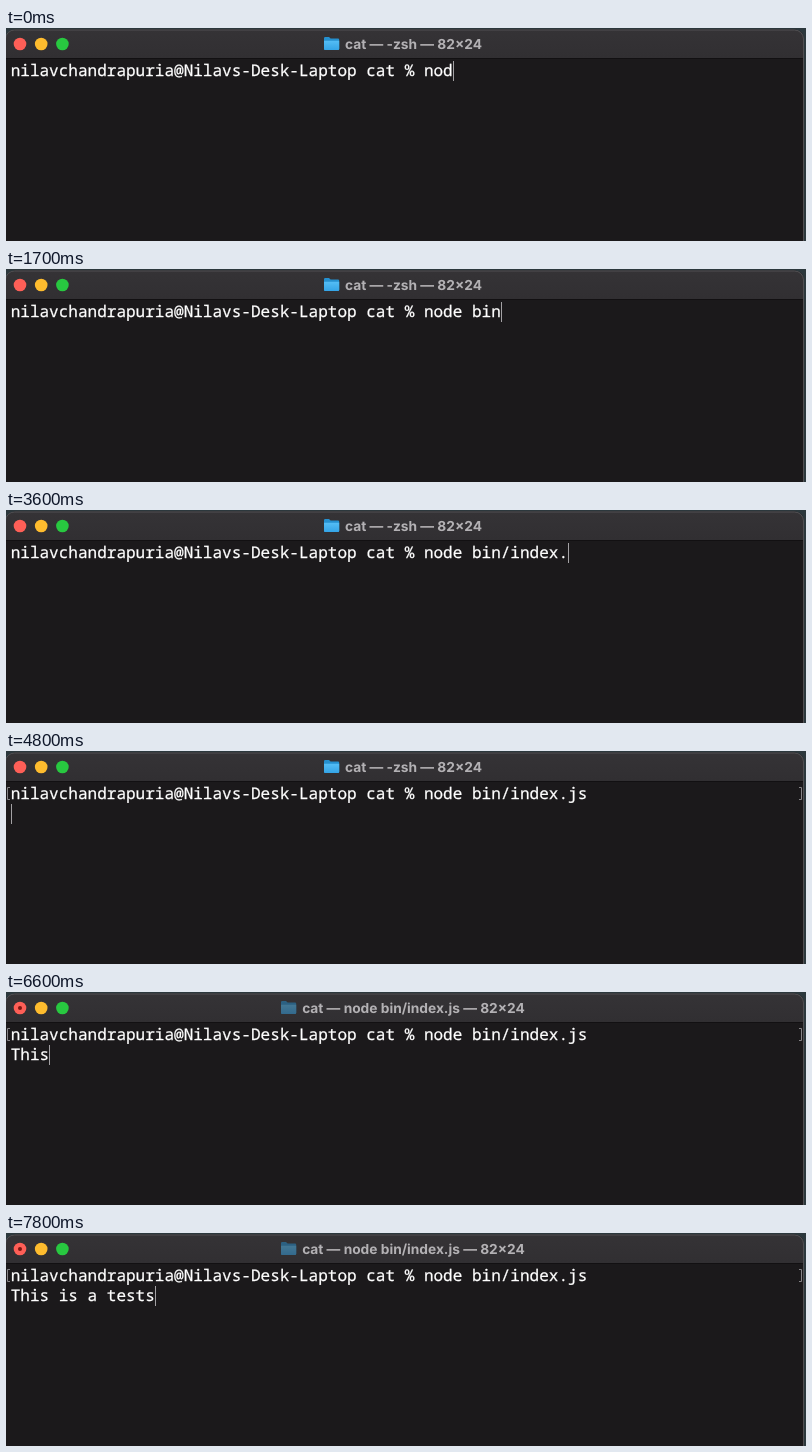
Recreate the animation shown at these times as an HTML page. Size 800 by 213 pixels, loop 8000 ms.

```html
<!DOCTYPE html>
<html lang="en">
<head>
<meta charset="utf-8">
<title>Terminal</title>
<style>
html, body { margin: 0; width: 100%; height: 100%; overflow: hidden; background: #2c383d; }
svg { display: block; width: 800px; height: 213px; }
text { white-space: pre; text-rendering: geometricPrecision; }
.mono { font: 500 16.02px "Noto Sans Mono", "DejaVu Sans Mono", monospace; fill: #fff; stroke: #fff; stroke-width: .25; }
#title { font: 700 13.75px Inter, "Open Sans", sans-serif; fill: #b3b1b4; text-anchor: middle; }
</style>
</head>
<body>
<svg viewBox="0 0 800 213">
  <defs>
    <clipPath id="frame"><rect x="0" y="1.5" width="798" height="240" rx="9"/></clipPath>
    <linearGradient id="bar" x2="0" y2="1">
      <stop offset="0" stop-color="#353336"/>
      <stop offset="1" stop-color="#312f32"/>
    </linearGradient>
    <linearGradient id="front" x2="0" y2="1">
      <stop offset="0" stop-color="#54bdf5"/>
      <stop offset="1" stop-color="#34a4e6"/>
    </linearGradient>
  </defs>
  <g clip-path="url(#frame)">
    <rect width="800" height="213" fill="#1b191b"/>
    <rect width="800" height="30" fill="url(#bar)"/>
    <rect y="30" width="800" height="1" fill="#121012"/>
  </g>
  <rect x="-.5" y="2" width="798" height="240" rx="9" fill="none" stroke="#504f52"/>
  <circle cx="14" cy="16" r="6.3" fill="#fe5f57"/>
  <circle id="busy" cx="14" cy="16" r="2" fill="#7d1710"/>
  <circle cx="35.2" cy="16" r="6.3" fill="#febc2e"/>
  <circle cx="56.4" cy="16" r="6.3" fill="#28c840"/>
  <g id="folder">
    <path d="M0 1.2Q0 0 1.2 0H5L6.6 1.6H14Q15.2 1.6 15.2 2.8V11.8Q15.2 13 14 13H1.2Q0 13 0 11.8Z" fill="#2590cf"/>
    <path d="M0 3.8H15.2V11.8Q15.2 13 14 13H1.2Q0 13 0 11.8Z" fill="url(#front)"/>
  </g>
  <text id="title" x="407.5" y="20.6"></text>
  <path id="marks" d="M4 36.5H1.5V48.5H4M793 36.5H795.5V48.5H793" fill="none" stroke="#858386"/>
  <text id="command" class="mono" x="4.7" y="48"></text>
  <text id="input" class="mono" x="4.7" y="68"></text>
  <rect id="cursor" width="1" height="20" fill="#a3a1a4"/>
</svg>
<script>
const LOOP = 8000, ENTER = 4800, RUNNING = 4900;
const LEFT = 4.7, ADVANCE = 9.612;
const prompt = "nilavchandrapuria@Nilavs-Desk-Laptop cat % ";

// Each line starts with some text; every key time adds one character.
const command = {
  start: prompt + "nod", keys: "e bin/index.js",
  times: [100, 200, 600, 900, 1100, 1800, 2000, 2100, 2300, 2700, 2900, 3300, 3700, 3900]
};
const input = {
  start: "", keys: "This is a tests",
  times: [5900, 6100, 6300, 6400, ...Array.from({ length: 11 }, (_, i) => 6800 + i * 100)]
};

const $ = id => document.getElementById(id);
const show = (id, on) => $(id).setAttribute("visibility", on ? "visible" : "hidden");
const typed = (line, t) => line.start + line.keys.slice(0, line.times.filter(k => k <= t).length);

function draw(t) {
  const entered = t >= ENTER, running = t >= RUNNING;
  const first = typed(command, t), second = typed(input, t);
  $("command").textContent = first;
  $("input").textContent = second;
  const length = (entered ? second : first).length;
  $("cursor").setAttribute("x", Math.round(LEFT + length * ADVANCE));
  $("cursor").setAttribute("y", entered ? 53 : 33);
  $("title").textContent = `cat — ${running ? "node bin/index.js" : "-zsh"} — 82×24`;
  $("folder").setAttribute("transform", `translate(${running ? 275 : 318} 9)`);
  $("folder").setAttribute("opacity", running ? 0.5 : 1);
  show("marks", entered);
  show("busy", running);
}

function tick() {
  draw(performance.now() % LOOP);
  requestAnimationFrame(tick);
}
tick();
</script>
</body>
</html>
```
